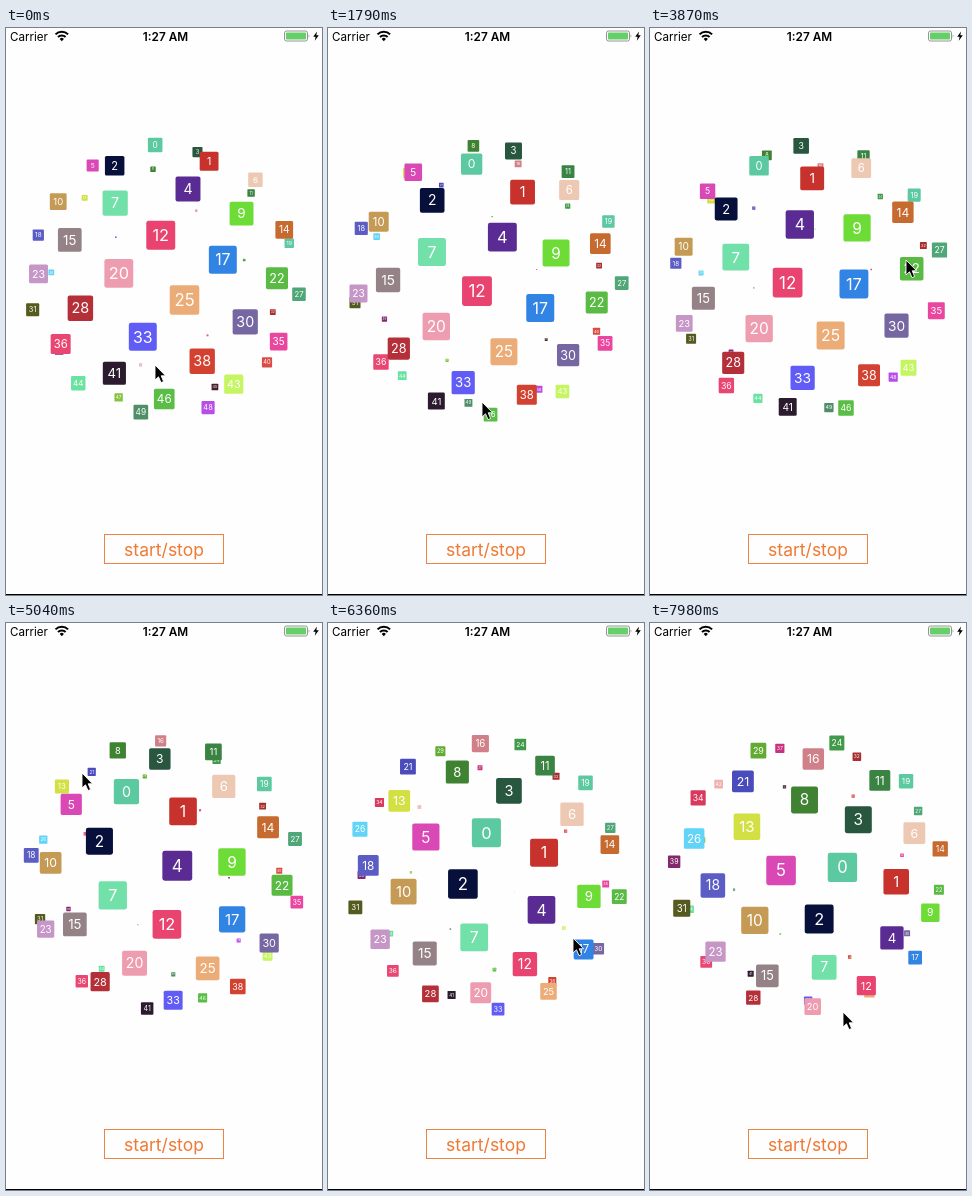
An HTML page for the animation above (8000 ms loop, 316 px wide and 567 px high).

```html
<!DOCTYPE html>
<html lang="en">
<head>
<meta charset="utf-8">
<title>Tag sphere</title>
<style>
  html, body { margin: 0; width: 100%; height: 100%; overflow: hidden; background: #fefefe; }
  svg { display: block; width: 100vw; height: 100vh; font-family: Inter, Roboto, sans-serif; }
  #tags text { fill: #fff; font-size: 17px; text-anchor: middle; }
</style>
</head>
<body>
<svg viewBox="0 0 316 567" xmlns="http://www.w3.org/2000/svg">
  <rect width="316" height="567" fill="#fefefe"/>

  <text x="4" y="12.5" font-size="11.6">Carrier</text>
  <g fill="none" stroke="#000" stroke-width="2">
    <path d="M49.5 6.4a8.8 8.8 0 0 1 12.6 0"/>
    <path d="M52 9a5.3 5.3 0 0 1 7.6 0"/>
  </g>
  <path d="M53.7 10.9a3 3 0 0 1 4.2 0l-2.1 2.3z"/>
  <text x="159.5" y="12.5" font-size="11.8" font-weight="600" text-anchor="middle">1:27 AM</text>
  <rect x="278.5" y="3" width="23" height="10" rx="2" fill="none" stroke="#888" stroke-width=".9"/>
  <rect x="280" y="4.5" width="20" height="7" rx=".8" fill="#66cf6a"/>
  <path d="M302.7 6.3q1.6 1.7 0 3.4z" fill="#888"/>
  <path d="M311 3.5l-3.8 5.2h2.4l-.8 4 4-5.4h-2.5z"/>

  <g id="tags"></g>

  <rect x="98.5" y="506.5" width="119" height="29" fill="none" stroke="#f08142"/>
  <text x="158" y="527.5" font-size="17.5" fill="#ee7a35" text-anchor="middle">start/stop</text>
  <rect y="566" width="316" height="1"/>

  <path id="cursor" d="M0 0V15L3.5 11.8L6 17.6L8.6 16.5L6.2 10.8H10.6Z" stroke="#fff" stroke-width=".9"/>
</svg>
<script>
const LOOP = 8000, COUNT = 50, TAG = 30;
const CENTER = { x: 158.5, y: 251.5 };
const GOLDEN = Math.PI * (3 - Math.sqrt(5));
const COLORS = `5cc9a0 c8322c 07103a 28563f 5b2b94 da48b6 edc9b4 72e0a9 3f8232 6edc36
  c59a54 3b8343 e8446f d2e044 c66a2f 958287 d08088 3183e4 5b5dc4 5cc9a0
  ee9db0 4a4cbb 59bb44 c696c6 409a4a ecac77 62d4f8 4fa676 b52f39 62ab32
  7667a2 555a1f a82f2e 605cf5 d8395c ea46a0 e94672 c93280 d34230 84286e
  dc4c46 2c1a2e eeb0b0 c5f560 6ae2a0 4a1c30 5abd45 84c440 b84ee8 4f8f68`.split(/\s+/);

// Keys: step, then roll, pitch and yaw in degrees
const POSES = [
  [0, 1.3, 8.6, -117.5],
  [12, -2.1, 35.5, -114.6],
  [20, -27.1, 31.7, -79.5],
  [26, -19.7, 28.5, -108.6],
  [34, -18.7, 53.7, -112.6],
  [43, 34.2, 75.2, -169.3],
  [54, 99.7, 64.6, 122]
].map(([at, roll, pitch, yaw]) => ({ at, v: orientation(roll, pitch, yaw) }));

// Keys: step, then the pointer tip
const POINTER = [
  [0, 149, 337], [6, 152, 448], [12, 154, 374], [20, 99, 203], [26, 256, 232],
  [29, 225, 430], [34, 76, 150], [43, 245, 315], [46, 240, 424], [48, 205, 330],
  [52, 200, 476], [54, 193, 389]
].map(([at, ...v]) => ({ at, v }));

function multiply([a, b, c, d], [e, f, g, h]) {
  return [
    a * e - b * f - c * g - d * h,
    a * f + b * e + c * h - d * g,
    a * g - b * h + c * e + d * f,
    a * h + b * g - c * f + d * e
  ];
}

function turn(axis, degrees) {
  const half = degrees * Math.PI / 360;
  const q = [Math.cos(half), 0, 0, 0];
  q[axis] = Math.sin(half);
  return q;
}

function orientation(roll, pitch, yaw) {
  return multiply(multiply(turn(3, roll), turn(1, -pitch)), turn(2, -yaw));
}

function rotate([w, x, y, z], p) {
  return multiply(multiply([w, x, y, z], [0, ...p]), [w, -x, -y, -z]).slice(1);
}

const mix = (a, b, k) => a.map((n, i) => n + (b[i] - n) * k);

function slerp(a, b, k) {
  let dot = a.reduce((sum, n, i) => sum + n * b[i], 0);
  if (dot < 0) {
    b = b.map(n => -n);
    dot = -dot;
  }
  const angle = Math.acos(Math.min(1, dot));
  if (angle < 1e-4) return a;
  const wa = Math.sin((1 - k) * angle) / Math.sin(angle);
  const wb = Math.sin(k * angle) / Math.sin(angle);
  return a.map((n, i) => n * wa + b[i] * wb);
}

function sample(keys, at, blend) {
  let i = 0;
  while (i < keys.length - 2 && keys[i + 1].at <= at) i++;
  const a = keys[i], b = keys[i + 1];
  return blend(a.v, b.v, Math.min(1, (at - a.at) / (b.at - a.at)));
}

function make(name, attrs, parent) {
  const el = document.createElementNS('http://www.w3.org/2000/svg', name);
  for (const key in attrs) el.setAttribute(key, attrs[key]);
  return parent.appendChild(el);
}

const layer = document.getElementById('tags');
const cursor = document.getElementById('cursor');

const tags = COLORS.map((color, i) => {
  const y = (2 * i + 1) / COUNT - 1;
  const r = Math.sqrt(1 - y * y);
  const el = make('g', {}, layer);
  make('rect', { x: -TAG / 2, y: -TAG / 2, width: TAG, height: TAG, rx: 2.4, fill: '#' + color }, el);
  make('text', { y: 6.1 }, el).textContent = i;
  return { el, point: [r * Math.cos(i * GOLDEN), y, r * Math.sin(i * GOLDEN)] };
});

// The picture advances in steps of about 0.15 s, slightly faster later on
function stepAt(t) {
  return t < 3869 ? Math.floor(t / 148.8) : 26 + Math.floor((t - 3869) / 146.2);
}

function draw(step) {
  const pose = sample(POSES, step, slerp);
  for (const tag of tags) {
    const [x, y, z] = rotate(pose, tag.point);
    const radius = 134.5 - 14.7 * z;
    tag.z = z;
    tag.el.setAttribute('transform',
      `translate(${CENTER.x + x * radius} ${CENTER.y + y * radius}) scale(${(1 + z) / 2})`);
  }
  layer.append(...[...tags].sort((a, b) => a.z - b.z).map(tag => tag.el));
  cursor.setAttribute('transform', `translate(${sample(POINTER, step, mix).join(' ')})`);
}

let shown = -1;
const start = performance.now();

function tick() {
  const step = stepAt((performance.now() - start) % LOOP);
  if (step !== shown) draw(shown = step);
  requestAnimationFrame(tick);
}
tick();
</script>
</body>
</html>
```
